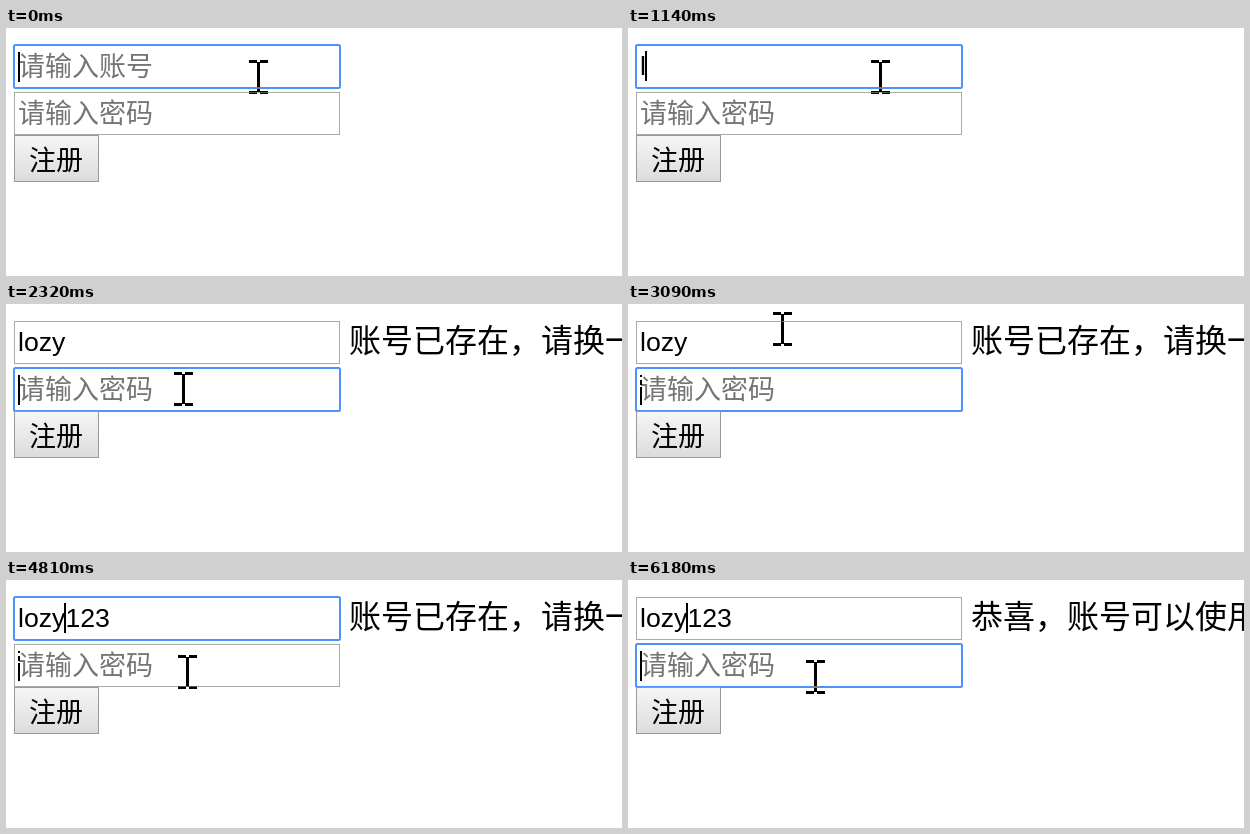
These frames come from a looping animation (616 by 248 pixels, 6650 ms). An HTML page:

```html
<!DOCTYPE html>
<html lang="zh">
<head>
<meta charset="utf-8">
<title>注册</title>
<style>
  html, body { margin: 0; width: 100%; height: 100%; overflow: hidden; background: #fff; }
  svg { display: block; width: 616px; height: 248px; background: #fff; isolation: isolate; }
  text { font: 27px "Noto Sans CJK SC", "Noto Sans CJK", sans-serif; font-kerning: none; white-space: pre; }
  .hint { fill: #757575; }
  .message { font-size: 32px; }
  #name { font: 26.667px "Liberation Sans", Arial, sans-serif; }
  .field { fill: #fff; stroke: #a9a9a9; }
  .focus { fill: none; stroke: #4d90fe; stroke-width: 2; }
  #pointer { fill: #fff; mix-blend-mode: difference; }
</style>
</head>
<body>
<svg viewBox="0 0 616 248">
  <defs>
    <linearGradient id="face" x2="0" y2="1">
      <stop stop-color="#f6f6f6"/>
      <stop offset="1" stop-color="#dcdcdc"/>
    </linearGradient>
  </defs>
  <rect width="616" height="248" fill="#fff"/>
  <rect class="field" x="8.5" y="17.5" width="325" height="42"/>
  <rect class="field" x="8.5" y="64.5" width="325" height="42"/>
  <rect id="focus" class="focus" x="8" width="326" height="43" rx="1.5"/>
  <rect x="8.5" y="107.5" width="84" height="46" fill="url(#face)" stroke="#999"/>
  <text x="23" y="142">注册</text>
  <text id="hint" class="hint" x="12" y="48">请输入账号</text>
  <text class="hint" x="12" y="95">请输入密码</text>
  <text id="name" x="12" y="47"></text>
  <text id="message" class="message" x="343" y="48"></text>
  <path id="carets"/>
  <path id="pointer" d="M0 0h8v3h-8zM11 0h8v3h-8zM8 2h3v30h-3zM0 31h8v3h-8zM11 31h8v3h-8z"/>
</svg>
<script>
const LOOP = 6650;
const $ = id => document.getElementById(id);
const TAKEN = '账号已存在，请换一个';
const FREE = '恭喜，账号可以使用';

// Each cue changes part of the state and holds until overridden.
// first / second / middle: caret marks, 'on' or 'broken'; tail: caret after the typed name.
const cues = [
  [0, { name: '', focus: 17, first: 'on', message: '', pointer: [243, 32] }],
  [440, { first: 'broken' }],
  [590, { name: 'l', first: '', tail: true }],
  [910, { name: '', first: 'on', tail: false }],
  [1140, { name: 'l', first: '', tail: true }],
  [1310, { name: 'lo' }],
  [1390, { name: 'loz' }],
  [1460, { name: 'lozy' }],
  [1840, { pointer: [239, 34] }],
  [1920, { pointer: [228, 39] }],
  [2010, { pointer: [213, 46], tail: false }],
  [2090, { pointer: [197, 54] }],
  [2170, { pointer: [183, 61] }],
  [2240, { pointer: [172, 66] }],
  [2320, { pointer: [168, 68], focus: 64, second: 'on', message: TAKEN }],
  [2850, { pointer: [165, 62], second: 'broken' }],
  [2930, { pointer: [157, 42] }],
  [3010, { pointer: [149, 20] }],
  [3090, { pointer: [145, 8] }],
  [3160, { pointer: [145, 13] }],
  [3240, { pointer: [144, 20] }],
  [3320, { pointer: [144, 24], focus: 17, middle: 'broken' }],
  [3850, { middle: 'on' }],
  [4020, { name: 'lozy1', tail: true }],
  [4100, { name: 'lozy12' }],
  [4170, { name: 'lozy123' }],
  [4400, { pointer: [147, 38] }],
  [4480, { pointer: [159, 70] }],
  [4560, { pointer: [173, 101] }],
  [4640, { pointer: [180, 117] }],
  [4730, { pointer: [177, 98], tail: false }],
  [4810, { pointer: [172, 75] }],
  [5180, { focus: 64, second: 'on', message: FREE }],
  [5640, { second: 'broken' }],
  [6100, { second: 'on', pointer: [175, 78] }],
  [6180, { pointer: [178, 80] }],
];

const bar = (x, top, bottom) => `M${x} ${top}h2V${bottom}h-2z`;

function caret(mode, x, y, gaps) {
  if (!mode) return '';
  let top = y, path = '';
  for (const [from, to] of mode === 'broken' ? gaps : []) {
    path += bar(x, top, y + from);
    top = y + to;
  }
  return path + bar(x, top, y + 30);
}

function render(time) {
  const state = Object.assign({}, ...cues.filter(([at]) => at <= time).map(([, change]) => change));
  $('name').textContent = state.name;
  $('hint').style.display = state.name ? 'none' : '';
  $('message').textContent = state.message;
  $('focus').setAttribute('y', state.focus);
  $('pointer').setAttribute('transform', `translate(${state.pointer})`);

  const gaps = [[2, 5], [10, 12]];
  const tailX = Math.floor(12 + $('name').getComputedTextLength() - 0.7);
  $('carets').setAttribute('d',
    caret(state.first, 12, 24, gaps) +
    caret(state.second, 12, 71, gaps) +
    caret(state.middle, 58, 23, [[9, 24]]) +
    caret(state.tail, tailX, 23));
}

function tick() {
  render(performance.now() % LOOP);
  requestAnimationFrame(tick);
}
tick();
</script>
</body>
</html>
```
